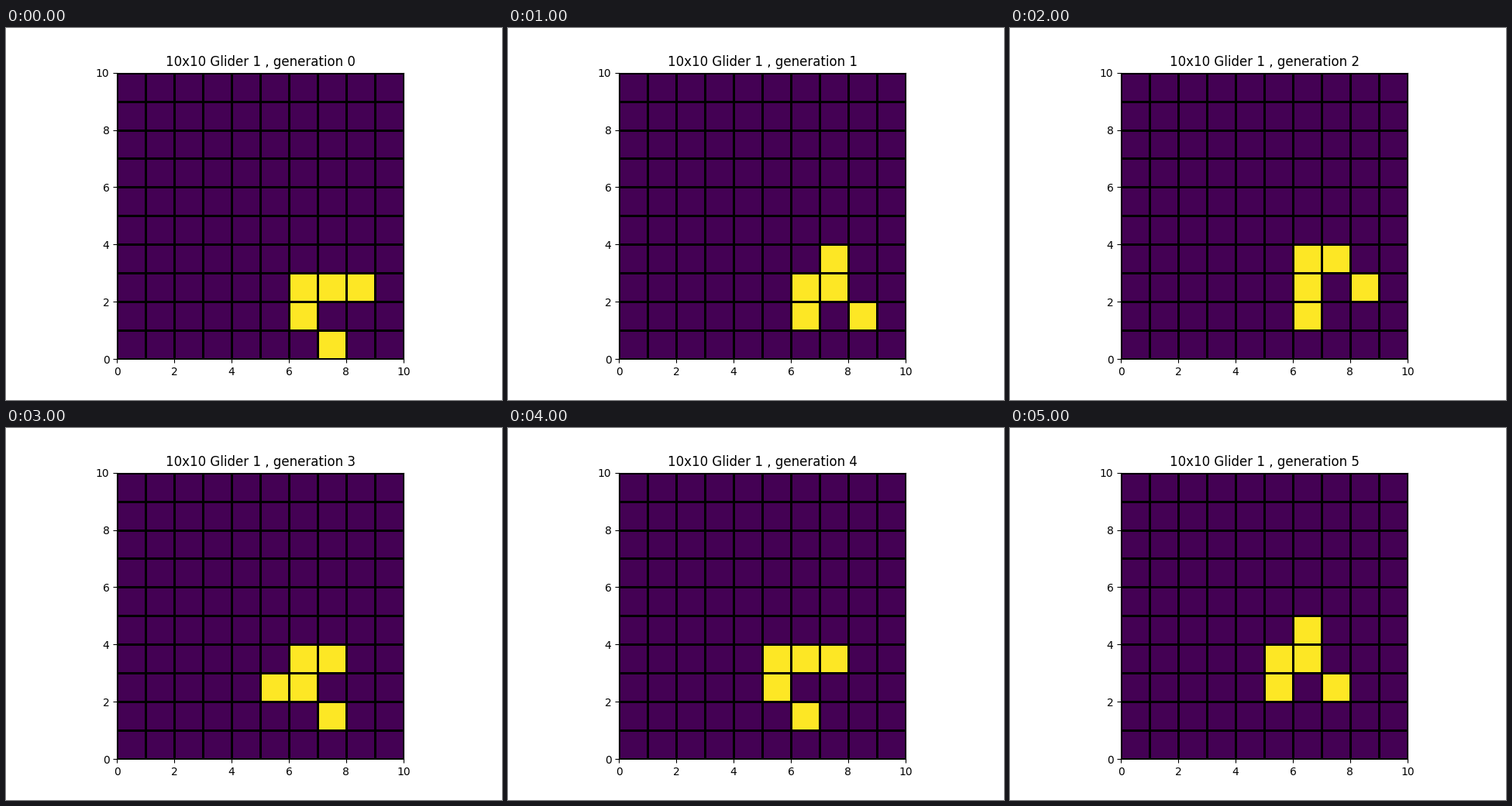
Write a matplotlib script that moves like this. It is 640 px wide and 480 px high and loops after 6 s.

```python
import matplotlib.pyplot as plt
import numpy as np
from matplotlib.animation import FuncAnimation

plt.rcParams["text.kerning_factor"] = 6  # even letter spacing in the title

SIZE = 10
GENERATIONS = 6
GLIDER = [(0, 7), (1, 6), (2, 6), (2, 7), (2, 8)]  # (row, column)


def step(grid):
    """Apply one Game of Life generation on a wrapped board."""
    shifts = [(r, c) for r in (-1, 0, 1) for c in (-1, 0, 1) if r or c]
    around = sum(np.roll(grid, s, axis=(0, 1)) for s in shifts)
    return ((around == 3) | ((grid == 1) & (around == 2))).astype(int)


def board(generation):
    grid = np.zeros((SIZE, SIZE), dtype=int)
    grid[tuple(zip(*GLIDER))] = 1
    for _ in range(generation):
        grid = step(grid)
    return grid


fig, ax = plt.subplots(figsize=(6.4, 4.8), dpi=100)
ax.set_aspect("equal")
mesh = ax.pcolormesh(board(0), cmap="viridis", vmin=0, vmax=1,
                     edgecolors="k", linewidths=2)
ax.set_xticks(range(0, SIZE + 1, 2))
ax.set_yticks(range(0, SIZE + 1, 2))
title = ax.set_title("")


def update(generation):
    mesh.set_array(board(generation))
    title.set_text(f"{SIZE}x{SIZE} Glider 1 , generation {generation}")
    return mesh, title


anim = FuncAnimation(fig, update, frames=GENERATIONS, interval=1000,
                     init_func=lambda: update(0), repeat=True, repeat_delay=0)
plt.show()
```
